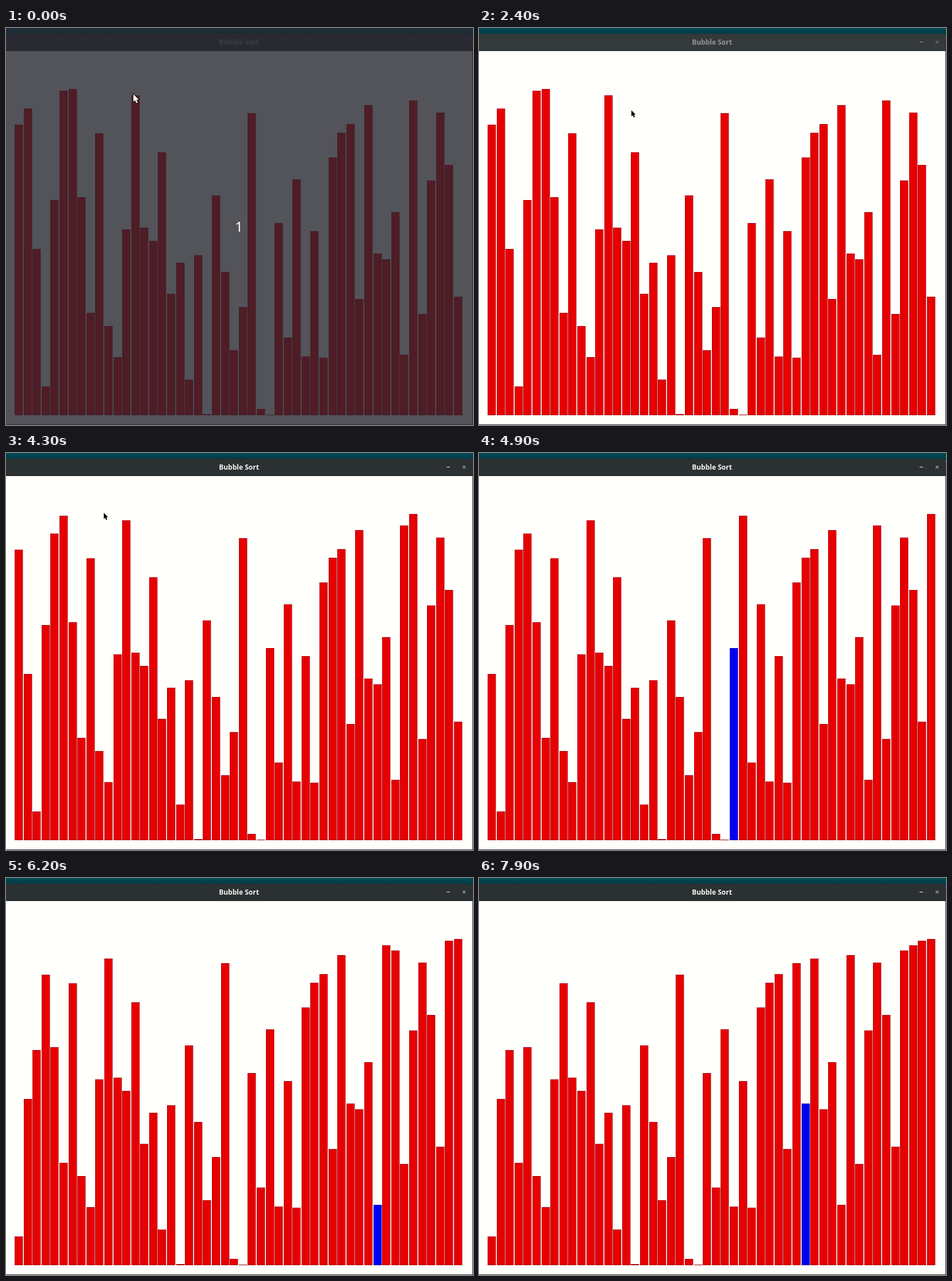
Recreate the animation shown at these times as an HTML page with a canvas. Size 812 by 690 pixels, loop 8 s.

```html
<!DOCTYPE html>
<html lang="en">
<head>
<meta charset="utf-8">
<title>Bubble Sort</title>
<style>
  html, body { margin: 0; width: 100%; height: 100%; overflow: hidden; background: #fffffc; }
  canvas { display: block; }
</style>
</head>
<body>
<canvas id="stage" width="812" height="690"></canvas>
<script>
const ctx = document.getElementById('stage').getContext('2d');
const LOOP = 8000, TICK = 100, BASE = 673, PITCH = 15.588;

// The unsorted input: top edge of each bar
const TOPS = [
  168, 140, 384, 623, 299, 109, 106, 294, 495, 183, 518, 572, 350, 117, 347, 370, 216,
  462, 408, 611, 395, 671, 291, 424, 560, 485, 148, 662, 672, 339, 538, 263, 571,
  353, 573, 225, 182, 167, 471, 134, 392, 402, 320, 568, 126, 497, 265, 147, 238, 467
];

// Key points: [time, comparisons done] and [time, x, y]
const PACE = [[3400, 0], [4300, 44.9], [4900, 77.4], [6200, 138.4], [7100, 187.4], [7900, 226.4]];
const POINTER = [[2300, 221, 116], [2400, 265, 143], [2500, 291, 168],
  [4100, 291, 168], [4300, 170, 104], [4500, 150, -20]];
const ARROW = new Path2D('M0 0V10.5L2.3 8.4L4 12.4L6 11.5L4.3 7.7L7.4 7.5Z');

function interpolate(keys, t, column = 1) {
  if (t <= keys[0][0]) return keys[0][column];
  const i = keys.findIndex(key => key[0] >= t);
  if (i < 0) return keys.at(-1)[column];
  const a = keys[i - 1], b = keys[i];
  return a[column] + (b[column] - a[column]) * (t - a[0]) / (b[0] - a[0]);
}

function bubbleSort(steps) {
  const tops = [...TOPS];
  let j = -1, last = tops.length - 1;
  for (let n = 0; n < steps; n++) {
    if (++j === last) { j = 0; last--; }
    if (tops[j] < tops[j + 1]) [tops[j], tops[j + 1]] = [tops[j + 1], tops[j]];
  }
  return { tops, current: j };
}

function rect(color, x, y, w, h) {
  ctx.fillStyle = color;
  ctx.fillRect(x, y, w, h);
}

function text(string, font, color, x, y) {
  ctx.font = font;
  ctx.fillStyle = color;
  ctx.textAlign = 'center';
  ctx.fillText(string, x, y);
}

function drawWindow(active) {
  const ink = active ? '#f4f4f0' : '#929595';
  const sky = ctx.createLinearGradient(0, 0, 0, 10);
  sky.addColorStop(0, '#004a55');
  sky.addColorStop(1, '#003c46');
  rect('#fffffc', 0, 0, 812, 690);
  rect(sky, 0, 0, 812, 14);
  ctx.fillStyle = active ? '#2b3032' : '#343939';
  ctx.beginPath();
  ctx.roundRect(-8, 10, 819, 30, [0, 6, 0, 0]);
  ctx.fill();
  rect('#1b1f20', 0, 39, 812, 1);
  rect('#2b3032', 811, 14, 1, 676);
  rect('#2b3032', 0, 689, 812, 1);
  text('Bubble Sort', 'bold 12px "Open Sans", sans-serif', ink, 405, 29);
  rect(ink, 766, 24, 6, 1);
  ctx.strokeStyle = ink;
  ctx.lineWidth = 1;
  ctx.beginPath();
  ctx.moveTo(794, 22); ctx.lineTo(799, 27);
  ctx.moveTo(799, 22); ctx.lineTo(794, 27);
  ctx.stroke();
}

function drawBars(tops, highlighted) {
  ctx.strokeStyle = 'rgba(80, 0, 40, 0.35)';
  ctx.lineWidth = 1;
  tops.forEach((top, i) => {
    const x = Math.floor(PITCH * (i + 1)), height = BASE - top;
    rect(i === highlighted ? '#0000f5' : '#e60000', x, top, 14, height);
    ctx.strokeRect(x + 0.5, top + 0.5, 14, height - 1);
  });
}

function drawPointer(x, y, fill, outline, scale) {
  ctx.save();
  ctx.translate(x, y);
  ctx.scale(scale, scale);
  ctx.lineWidth = 1.6;
  ctx.strokeStyle = outline;
  ctx.stroke(ARROW);
  ctx.fillStyle = fill;
  ctx.fill(ARROW);
  ctx.restore();
}

function draw(t) {
  const progress = interpolate(PACE, t);
  const { tops, current } = bubbleSort(Math.floor(progress));
  drawWindow(t >= 2900);
  // The highlight is cleared shortly before the next comparison
  drawBars(tops, progress % 1 < 0.8 ? current : -1);
  if (t < TICK) {
    rect('rgba(37, 38, 47, 0.79)', 0, 0, 812, 690);
    text('1', '24px "Noto Sans", sans-serif', '#fff', 405, 354);
    drawPointer(221.5, 115, '#fff', '#111', 1.25);
  } else {
    drawPointer(interpolate(POINTER, t, 1), interpolate(POINTER, t, 2), '#000', '#fff', 1);
  }
}

const start = performance.now();
function frame() {
  const t = (performance.now() - start) % LOOP;
  draw(Math.floor(t / TICK) * TICK);
  requestAnimationFrame(frame);
}
frame();
</script>
</body>
</html>
```
